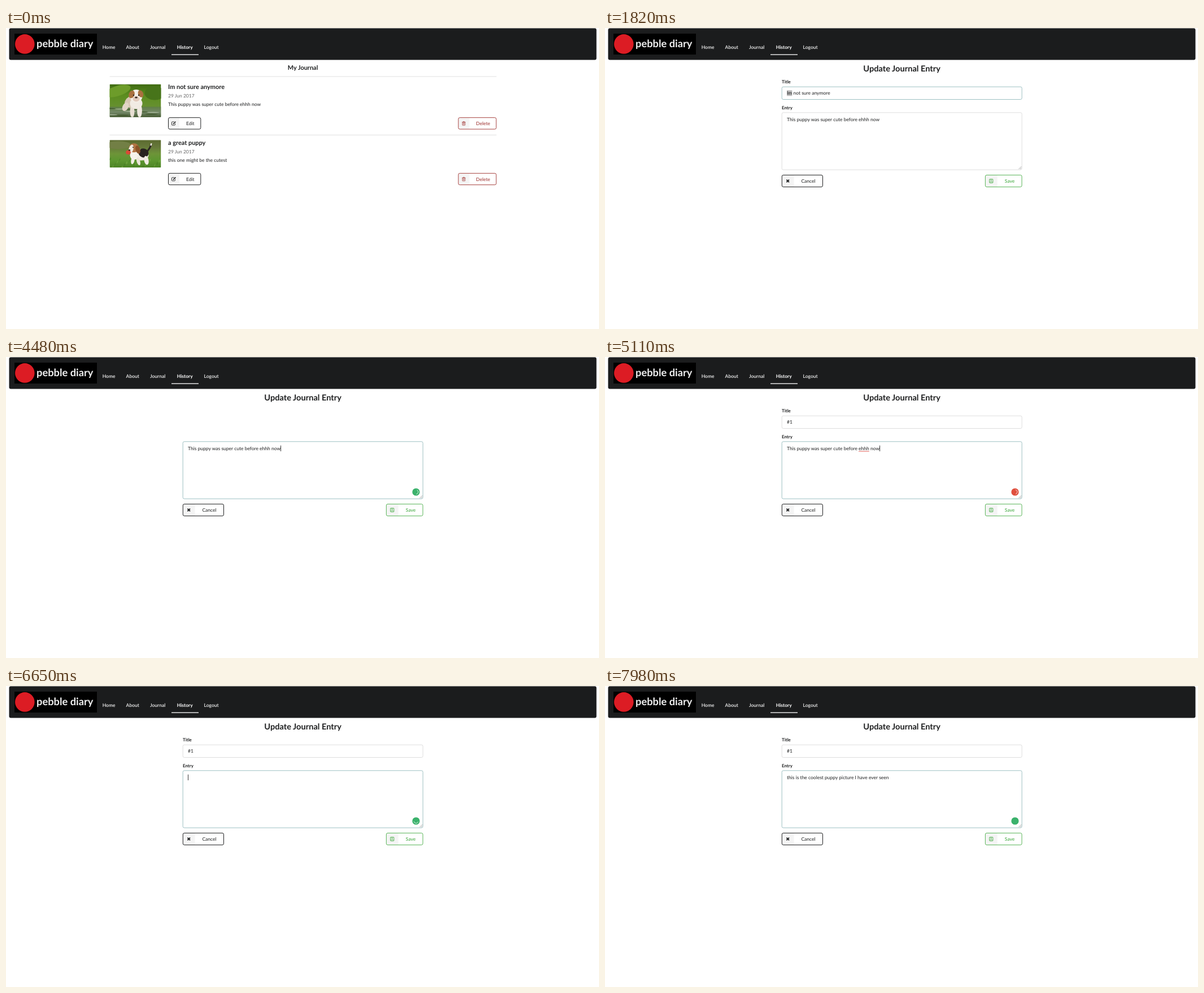
These frames come from a looping animation (1050 by 533 pixels, 8000 ms). An HTML page with a canvas:

```html
<!DOCTYPE html>
<html lang="en">
<head>
<meta charset="utf-8">
<title>Journal entries</title>
<style>
  html, body { margin: 0; width: 100%; height: 100%; overflow: hidden; background: #fff; }
  canvas { display: block; width: 1050px; height: 533px; }
</style>
</head>
<body>
<canvas id="stage"></canvas>
<script>
const W = 1050, H = 533, LOOP = 8000, STEP = 70;
const EM = 8.51;
const INK = '#1f2021', BAR = '#1b1c1d', LINE = '#dedede', FOCUS = '#9dc0c3';
const RED = '#a5403e', GREEN = '#58b457', SELECT = '#bcbcbc';
const OLD_TITLE = 'Im not sure anymore';
const OLD_ENTRY = 'This puppy was super cute before ehhh now';
const NEW_ENTRY = 'this is the coolest puppy picture I have ever seen';

const canvas = document.getElementById('stage');
const ctx = canvas.getContext('2d');
const ratio = window.devicePixelRatio || 1;
canvas.width = W * ratio;
canvas.height = H * ratio;
ctx.scale(ratio, ratio);
ctx.textRendering = 'geometricPrecision';

function setFont(size = EM, weight = 400) {
  ctx.font = `${weight} ${size}px Lato, sans-serif`;
}

function text(str, x, y, { size, weight, color = INK, align = 'left' } = {}) {
  setFont(size, weight);
  ctx.fillStyle = color;
  ctx.textAlign = align;
  ctx.fillText(str, x, y);
}

function widthOf(str) {
  setFont();
  return ctx.measureText(str).width;
}

function rect(x, y, w, h, color) {
  ctx.fillStyle = color;
  ctx.fillRect(x, y, w, h);
}

function box(x, y, w, h, r, { fill, stroke, line = 1 }) {
  ctx.beginPath();
  ctx.roundRect(x, y, w, h, r);
  if (fill) { ctx.fillStyle = fill; ctx.fill(); }
  if (stroke) { ctx.strokeStyle = stroke; ctx.lineWidth = line; ctx.stroke(); }
}

function oval(x, y, rx, ry, color, turn = 0) {
  ctx.beginPath();
  ctx.ellipse(x, y, rx, ry, turn, 0, Math.PI * 2);
  ctx.fillStyle = color;
  ctx.fill();
}

function path(points, color, width) {
  ctx.beginPath();
  points.forEach(([x, y], i) => i ? ctx.lineTo(x, y) : ctx.moveTo(x, y));
  ctx.strokeStyle = color;
  ctx.lineWidth = width;
  ctx.stroke();
}

function shade(x, y, w, h, colors) {
  const g = ctx.createLinearGradient(0, y, 0, y + h);
  colors.forEach((c, i) => g.addColorStop(i / (colors.length - 1), c));
  rect(x, y, w, h, g);
}

function inFrame(x, y, w, h, draw) {
  ctx.save();
  ctx.beginPath();
  ctx.roundRect(x, y, w, h, 1);
  ctx.clip();
  ctx.translate(x, y);
  draw(w, h);
  ctx.restore();
}

// Icons, centred on (x, y)
const icons = {
  edit(x, y, color) {
    box(x - 3.6, y - 2.8, 6, 6, 1, { stroke: color, line: 0.9 });
    path([[x - 1.2, y + 1.3], [x + 3.4, y - 3.1]], '#f5f5f5', 3);
    path([[x - 1.2, y + 1.3], [x + 3.4, y - 3.1]], color, 1.5);
  },
  trash(x, y, color) {
    box(x - 2.4, y - 1.8, 4.8, 5.2, 0.6, { stroke: color, line: 0.8 });
    path([[x - 3.3, y - 2.2], [x + 3.3, y - 2.2]], color, 0.8);
    path([[x - 1.2, y - 2.4], [x - 0.8, y - 3.4], [x + 0.8, y - 3.4], [x + 1.2, y - 2.4]], color, 0.7);
    for (const d of [-1, 0, 1]) path([[x + d, y - 0.7], [x + d, y + 2.2]], color, 0.5);
  },
  cross(x, y, color) {
    path([[x - 2.3, y - 2.3], [x + 2.3, y + 2.3]], color, 1.9);
    path([[x - 2.3, y + 2.3], [x + 2.3, y - 2.3]], color, 1.9);
  },
  disk(x, y, color) {
    box(x - 3.3, y - 3.3, 6.6, 6.6, 0.6, { stroke: color, line: 0.8 });
    box(x - 1.7, y - 3.2, 3.2, 2.1, 0, { stroke: color, line: 0.7 });
    box(x - 1.9, y + 0.6, 3.8, 2.6, 0, { stroke: color, line: 0.7 });
  }
};

function button(x, y, w, h, cell, icon, label, labelX, color, weight) {
  box(x, y, w, h, 2.5, { fill: '#fff' });
  rect(x + 0.5, y + 0.5, cell - 0.5, h - 1, '#f4f4f4');
  box(x, y, w, h, 2.5, { stroke: color, line: 1 });
  icons[icon](x + cell / 2 - 0.2, y + h / 2, color);
  text(label, labelX, y + h / 2 + 3, { color, weight });
}

function header() {
  box(5.5, 0.5, 1040, 56, 3, { fill: BAR });
  rect(15, 10, 146, 37, '#000');
  oval(33.3, 28.4, 17.3, 17.3, '#dc1c24');
  text('pebble diary', 54, 34, { size: 18.3, weight: 700, color: '#efefef' });
  const items = [['Home', 170.7], ['About', 212.6], ['Journal', 255], ['Logout', 350.6]];
  for (const [label, x] of items) text(label, x, 37, { color: '#f4f4f4', weight: 600 });
  text('History', 302.7, 37, { color: '#fff', weight: 700 });
  rect(293, 46.5, 48, 1.3, '#fff');
}

function waterPuppy() {
  inFrame(183.5, 99.5, 91, 58.3, (w, h) => {
    shade(0, 0, w, h, ['#3f6a12', '#5b8d1f', '#66902f', '#48692d']);
    oval(14, 12, 24, 9, '#6d9c2a', -0.3);
    oval(80, 16, 18, 12, '#47741a');
    shade(0, 40, w, 19, ['#5f7f45', '#748868', '#40552d']);
    for (let i = 0; i < 9; i++) {
      oval((i * 37) % 91, 43 + (i * 5) % 14, 11, 0.7, i % 2 ? '#a9b89c' : '#3c5427');
    }
    oval(39, 31, 13, 10, '#d8c7b4', -0.5);
    oval(28, 40, 5, 8, '#e2d5c5', 0.5);
    oval(40, 48, 4, 11, '#e8dfd3');
    oval(53, 47, 4.4, 12, '#f0e9e0');
    oval(47, 34, 11, 10, '#f1ebe3');
    oval(47, 21, 11, 11.5, '#f4efe8');
    oval(39, 18, 5, 7, '#a9703f', 0.4);
    oval(55, 17, 4.5, 6.5, '#a9703f', -0.4);
    oval(47, 26, 6, 5, '#e3cbbd');
    oval(47, 23.5, 2.4, 1.6, '#3b2c25');
    oval(42.5, 19.5, 1.2, 1.2, '#2a211c');
    oval(51.5, 19.5, 1.2, 1.2, '#2a211c');
  });
}

function grassPuppy() {
  inFrame(183.5, 198.3, 91, 48.7, (w, h) => {
    shade(0, 0, w, h, ['#5b6a2f', '#66783a', '#6d9438', '#5c962f', '#4c8425']);
    oval(15, 9, 22, 7, '#727f45');
    for (let i = 0; i < 30; i++) {
      const x = (i * 29) % 91, y = 31 + (i * 7) % 17;
      path([[x, y + 4], [x + 1.5, y]], i % 2 ? '#7fb04a' : '#447a22', 0.7);
    }
    path([[66, 21], [71, 14], [74, 7]], '#2b2622', 3);
    path([[73, 10], [74, 6]], '#f3eee6', 2.4);
    oval(54, 26, 15, 10, '#f1ece3', 0.15);
    oval(60, 23, 9, 8, '#27231f', 0.3);
    oval(41, 36, 3, 7, '#f3eee6', 0.2);
    oval(51, 38, 3, 7, '#ebe4d8', -0.3);
    oval(65, 36, 4, 8, '#f1ece3', -0.2);
    oval(43, 27, 7, 8, '#f6f2eb');
    oval(43, 14, 9, 8, '#b27443');
    oval(38, 16, 4, 8, '#f3ece2', 0.3);
    oval(50, 17, 4, 7.5, '#8b5329', -0.3);
    oval(33, 22, 4.3, 3.8, '#d94a35');
    oval(35, 18, 1.6, 1.3, '#2a211c');
    oval(41.5, 13, 1, 1, '#2a211c');
  });
}

function journalItem(y, title, body) {
  text(title, 287, y, { size: 10.94, weight: 700 });
  text('29 Jun 2017', 287, y + 14.5, { color: '#666' });
  text(body, 287, y + 30, {});
  button(287.5, y + 50.3, 57.3, 20.4, 19.5, 'edit', 'Edit', 319, INK);
  button(801, y + 50.3, 67, 20.4, 19.5, 'trash', 'Delete', 832.3, RED, 500);
}

function historyPage() {
  text('My Journal', 525.6, 73.7, { size: 10.94, weight: 700, align: 'center' });
  rect(183.5, 85.5, 685, 0.9, LINE);
  rect(183.5, 189, 685, 0.9, LINE);
  waterPuppy();
  grassPuppy();
  journalItem(108.4, OLD_TITLE, 'This puppy was super cute before ehhh now');
  journalItem(207, 'a great puppy', 'this one might be the cutest');
}

function field(y, h, focused) {
  box(313.2, y, 425, h, 2.5, { fill: '#fff', stroke: focused ? FOCUS : LINE });
}

// A line of editable text with optional selection, misspelt word and caret
function editable(baseline, value, { selected = '', caret = false, misspelt = '' }) {
  const x = 322;
  if (selected) rect(x, baseline - 8, widthOf(selected), 10, SELECT);
  text(value, x, baseline);
  if (misspelt) {
    const start = x + widthOf(value.slice(0, value.indexOf(misspelt)));
    rect(start, baseline + 1.6, widthOf(misspelt), 0.9, '#e0524a');
  }
  if (caret) rect(x + widthOf(value), baseline - 8.3, 0.9, 10.3, '#222');
}

function checker(t, color, spinning) {
  const x = 726, y = 239;
  oval(x, y, 6.6, 6.6, color);
  if (!spinning) return;
  const mid = ((t - 4480) / 212) * Math.PI * 2 + 0.15;
  ctx.beginPath();
  ctx.arc(x, y, 3.9, mid - 1.3, mid + 1.3);
  ctx.strokeStyle = 'rgba(255,255,255,.8)';
  ctx.lineWidth = 1;
  ctx.stroke();
}

function titleState(t) {
  if (t < 1610) return [OLD_TITLE, {}];
  if (t < 1820) return [OLD_TITLE, { caret: t < 1750 }];
  if (t < 1960) return [OLD_TITLE, { selected: 'Im' }];
  if (t < 2100) return [OLD_TITLE, { selected: OLD_TITLE }];
  if (t < 3010) return ['', { caret: t < 2520 }];
  if (t < 3500) return ['#', { caret: true }];
  return ['#1', { caret: t < 4060 }];
}

function entryState(t) {
  if (t < 4060) return [OLD_ENTRY, {}];
  const misspelt = t >= 5040 ? 'ehhh' : '';
  if (t < 5460) return [OLD_ENTRY, { caret: (t - 4060) % 980 < 490, misspelt }];
  if (t < 6300) return [OLD_ENTRY, { selected: OLD_ENTRY, misspelt }];
  if (t < 7280) return ['', { caret: true }];
  const typed = Math.ceil(NEW_ENTRY.length * Math.min(1, (t - 7210) / 630));
  return [NEW_ENTRY.slice(0, typed), { caret: t < 7910 }];
}

function editPage(t) {
  const inEntry = t >= 4060;
  text('Update Journal Entry', 525.6, 77.3, { size: 14.6, weight: 700, align: 'center' });
  if (t < 4340 || t >= 4690) {
    text('Title', 313, 98.3, { size: 7.9, weight: 700 });
    field(104.2, 22.3, t >= 1610 && !inEntry);
    editable(118.3, ...titleState(t));
    text('Entry', 313, 144, { size: 7.9, weight: 700 });
  }
  field(149.8, 101.3, inEntry);
  editable(165, ...entryState(t));
  path([[732.5, 250], [737.3, 245.2]], '#888', 0.7);
  path([[735, 250], [737.3, 247.7]], '#888', 0.7);
  if (t >= 4200) {
    const wrong = t >= 5040 && t < 6300;
    checker(t, wrong ? '#e0503f' : '#3bb26c', t < 7000);
  }
  button(313.3, 260.4, 72.2, 21, 21.2, 'cross', 'Cancel', 347.4, INK);
  button(673.4, 260.4, 64.7, 21, 21.2, 'disk', 'Save', 707.8, GREEN, 600);
}

function draw(now) {
  const t = Math.floor((now % LOOP) / STEP) * STEP;
  rect(0, 0, W, H, '#fff');
  header();
  if (t < 980) historyPage();
  else editPage(t);
}

let start;
function tick(now) {
  start ??= now;
  draw(now - start);
  requestAnimationFrame(tick);
}
draw(0);
requestAnimationFrame(tick);
</script>
</body>
</html>
```
